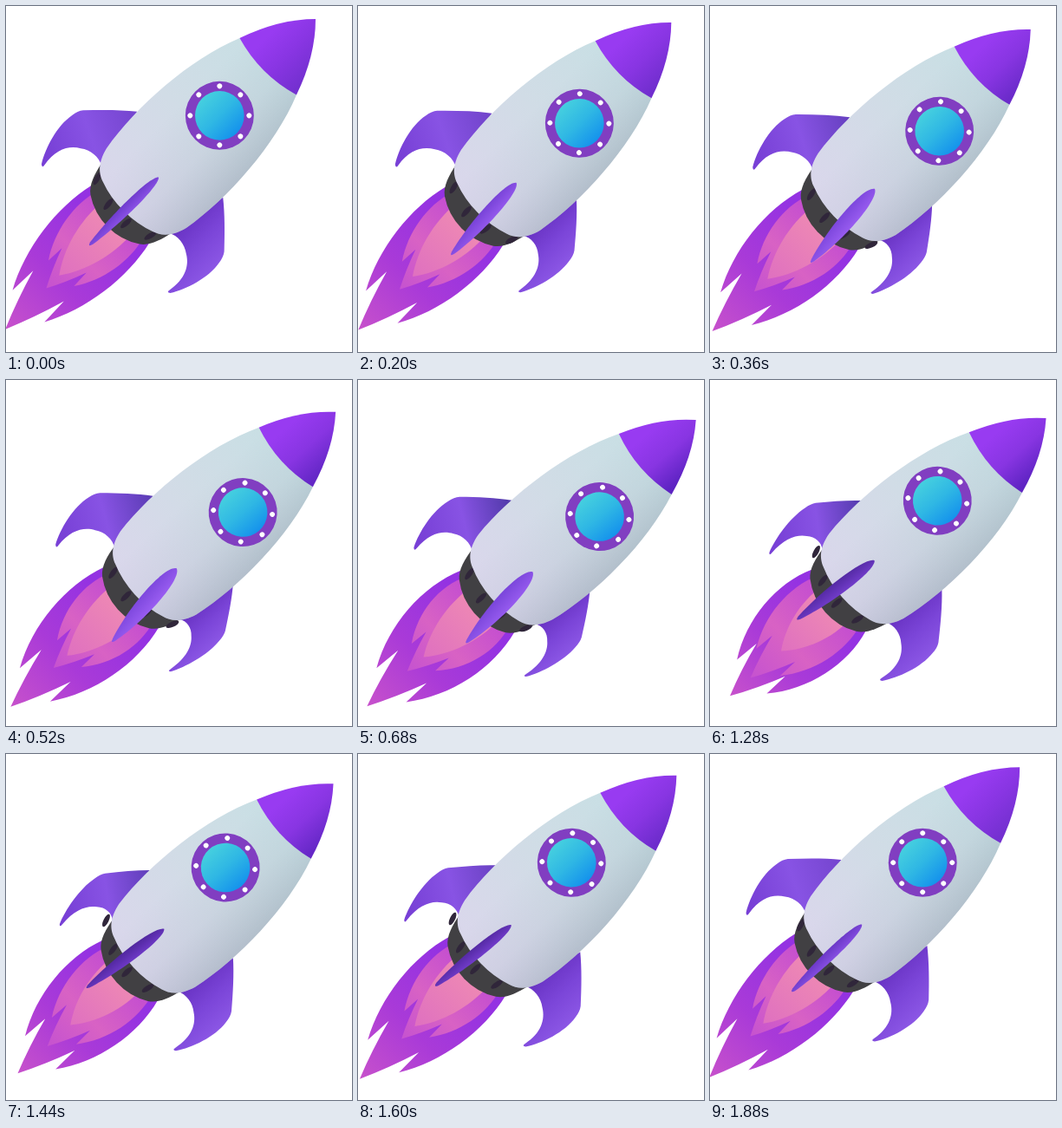
An HTML page with a canvas that plays this animation: 399 by 399 pixels, repeating every 1.92 s.

```html
<!DOCTYPE html>
<html lang="en">
<head>
<meta charset="utf-8">
<title>Rocket</title>
<style>
html, body { margin: 0; width: 100%; height: 100%; overflow: hidden; background: #fff; }
canvas { display: block; width: 399px; height: 399px; }
</style>
</head>
<body>
<canvas id="stage" width="399" height="399"></canvas>
<script>
const ctx = document.getElementById('stage').getContext('2d');
const LOOP = 1920, STEP = 40, TILT = 0.086;
const FLAME_TOP = 318, FLAME_LEN = 184, FIN_ROOT = 60;

// The rocket is built upright: nose tip at 0,0, axis along y, mirrored in x.
let p = 0;    // travel along the path, 0..1
let s = 0;    // roll about the axis, -1..1
let burn = 0; // shortening of the outer flame in px

function gradient(x0, y0, x1, y1, ...colors) {
  const g = ctx.createLinearGradient(x0, y0, x1, y1);
  colors.forEach((c, i) => g.addColorStop(i / (colors.length - 1), c));
  return g;
}

function mix(a, b, k) {
  return 'rgb(' + a.map((v, i) => Math.round(v + (b[i] - v) * k)).join(',') + ')';
}

// A segment holds 1, 2 or 3 points: line, quadratic or cubic.
function segment(points) {
  const kind = ['lineTo', 'quadraticCurveTo', 'bezierCurveTo'][points.length - 1];
  ctx[kind](...points.flat());
}

function shape(fill, start, segments) {
  ctx.beginPath();
  ctx.moveTo(...start);
  segments.forEach(segment);
  ctx.closePath();
  ctx.fillStyle = fill;
  ctx.fill();
}

// Adds the same segments backwards on the other side of the axis.
function symmetric(fill, start, half) {
  const back = half.map((seg, i) => {
    const from = i ? half[i - 1].at(-1) : start;
    return [from, ...seg.slice(0, -1)].reverse().map(([x, y]) => [-x, y]);
  }).reverse();
  shape(fill, start, [...half, ...back]);
}

function disc(x, y, r, fill) {
  ctx.beginPath();
  ctx.arc(x, y, r, 0, Math.PI * 2);
  ctx.fillStyle = fill;
  ctx.fill();
}

function at(x, y, paint) {
  ctx.save();
  ctx.translate(x, y);
  paint();
  ctx.restore();
}

function flameLayer(width, length, ...colors) {
  const bow = 6 * p;
  at(0, FLAME_TOP, () => {
    ctx.scale(width, length / FLAME_LEN);
    symmetric(gradient(0, 20, 0, FLAME_LEN, ...colors), [47, 0], [
      [[58 + bow, 46], [50 + bow, 104], [26, 147]],
      [[25, 115]],
      [[14, 152], [0, FLAME_LEN]]
    ]);
  });
}

function flame() {
  flameLayer(1, FLAME_LEN - burn, '#9432e2', '#a93ad8', '#c751cb');
  flameLayer(0.8, 124 + 0.7 * burn, '#c650cf', '#d862c4', '#c552d0');
  const tip = 98 - 0.55 * burn;
  at(0, FLAME_TOP, () => symmetric(gradient(0, 0, 0, tip, '#f08cb2', '#df70c0'), [25, 5], [
    [[28, tip * 0.4], [18, tip * 0.75], [0, tip]]
  ]));
}

// Rolling brings one fin forward and foreshortens the other.
function fin(side, fill) {
  const reach = 1 + (-6 * p - 3.5 * s * s - side * 5.5 * s) / 50;
  at(side * FIN_ROOT, 0, () => {
    ctx.scale(side * reach, 1);
    shape(fill, [45, 342], [
      [[55, 326], [64, 298], [60, 277]],
      [[59, 269], [55, 264]],
      [[40, 248], [25, 233], [10, 221]],
      [[-5, 294]],
      [[4, 289], [17, 290], [26, 297]],
      [[38, 304], [46, 318], [42, 340]],
      [[41, 345], [45, 342]]
    ]);
  });
}

function fins() {
  const shade = mix([118, 70, 208], [76, 56, 165], p);
  fin(-1, gradient(47, 330, -1, 233, '#7840d6', '#8853e4', shade));
  fin(1, gradient(-6, 280, 64, 280, '#6630c0', '#7b45d8', '#8d58e6'));
}

function collar() {
  symmetric('#414043', [57, 292], [
    [[54, 306], [50, 320], [40, 327]],
    [[22, 339], [0, 339]]
  ]);
  for (let i = 0; i < 4; i++) {
    const x = -48 + 30 * i + 13 * s;
    ctx.beginPath();
    ctx.ellipse(x, 322 - x * x * 0.006, 3, 8, x * 0.006, 0, Math.PI * 2);
    ctx.fillStyle = '#30263a';
    ctx.fill();
  }
}

function hull() {
  const start = [46.3, 77.5];
  const side = [
    [[70, 136], [75, 218], [65, 276]],
    [[60, 296], [50, 303], [41, 306]],
    [[22, 313], [0, 313]]
  ];
  symmetric(gradient(0, 70, 0, 300, '#c8dfe4', '#d1dce6', '#d9d7eb'), start, side);
  symmetric(gradient(-40, 0, 74, 0, 'rgba(150,165,180,0)', 'rgba(150,165,180,.14)',
    'rgba(130,145,160,.42)'), start, side);
  const edge = mix([116, 48, 208], [88, 32, 190], p);
  symmetric(gradient(-25, 0, 41, 0, '#983bf1', '#8835e2', edge), [0, 0], [
    [[30, 30], start],
    [[23, 84.2], [0, 84.2]]
  ]);
}

function porthole() {
  at(0.5 + 13.4 * s, 157, () => {
    ctx.rotate(0.04 * p);
    disc(0, 0, 39.5, '#813ec1');
    disc(0, 0, 28.3, gradient(-28, 0, 28, 0, '#45cfdf', '#2fb7e4', '#1593ec'));
    for (let i = 0; i < 8; i++) {
      const a = i * Math.PI / 4;
      disc(34 * Math.cos(a), 34 * Math.sin(a), 2.9, '#fff');
    }
  });
}

function centerFin() {
  const top = [1 + 9.5 * s, 257], end = [21 * s + 4 * p, 369];
  const dx = end[0] - top[0], dy = end[1] - top[1];
  const len = Math.hypot(dx, dy);
  const wide = 5.5 + 2 * p + 2.5 * Math.max(0, s);
  const far = mix([112, 60, 206], s > 0 ? [126, 72, 222] : [82, 40, 160], Math.abs(s));
  const near = mix([136, 80, 228], s > 0 ? [152, 92, 240] : [108, 56, 196], Math.abs(s));
  at(...top, () => {
    ctx.rotate(-Math.atan2(dx, dy));
    symmetric(gradient(-wide, 0, wide, 0, far, near), [0, 0], [
      [[wide * 1.4, len * 0.05], [wide * 1.4, len * 0.6], [2, len * 0.97]],
      [[1, len], [0, len]]
    ]);
  });
}

function draw(t) {
  const phase = t / LOOP * Math.PI * 2;
  p = (1 - Math.cos(phase)) / 2;
  s = Math.sin(phase);
  burn = 24 * Math.max(0, Math.cos(phase - Math.PI * 7 / 6)) - 4;

  ctx.setTransform(1, 0, 0, 1, 0, 0);
  ctx.fillStyle = '#fff';
  ctx.fillRect(0, 0, 399, 399);
  ctx.translate(43 * p, 8 * p);
  ctx.rotate(TILT * p);
  ctx.translate(357, 15);
  ctx.rotate(Math.PI / 4);

  flame();
  fins();
  collar();
  hull();
  porthole();
  centerFin();
}

const began = performance.now();
function tick() {
  const t = (performance.now() - began) % LOOP;
  draw(Math.floor(t / STEP) * STEP);
  requestAnimationFrame(tick);
}
tick();
</script>
</body>
</html>
```
